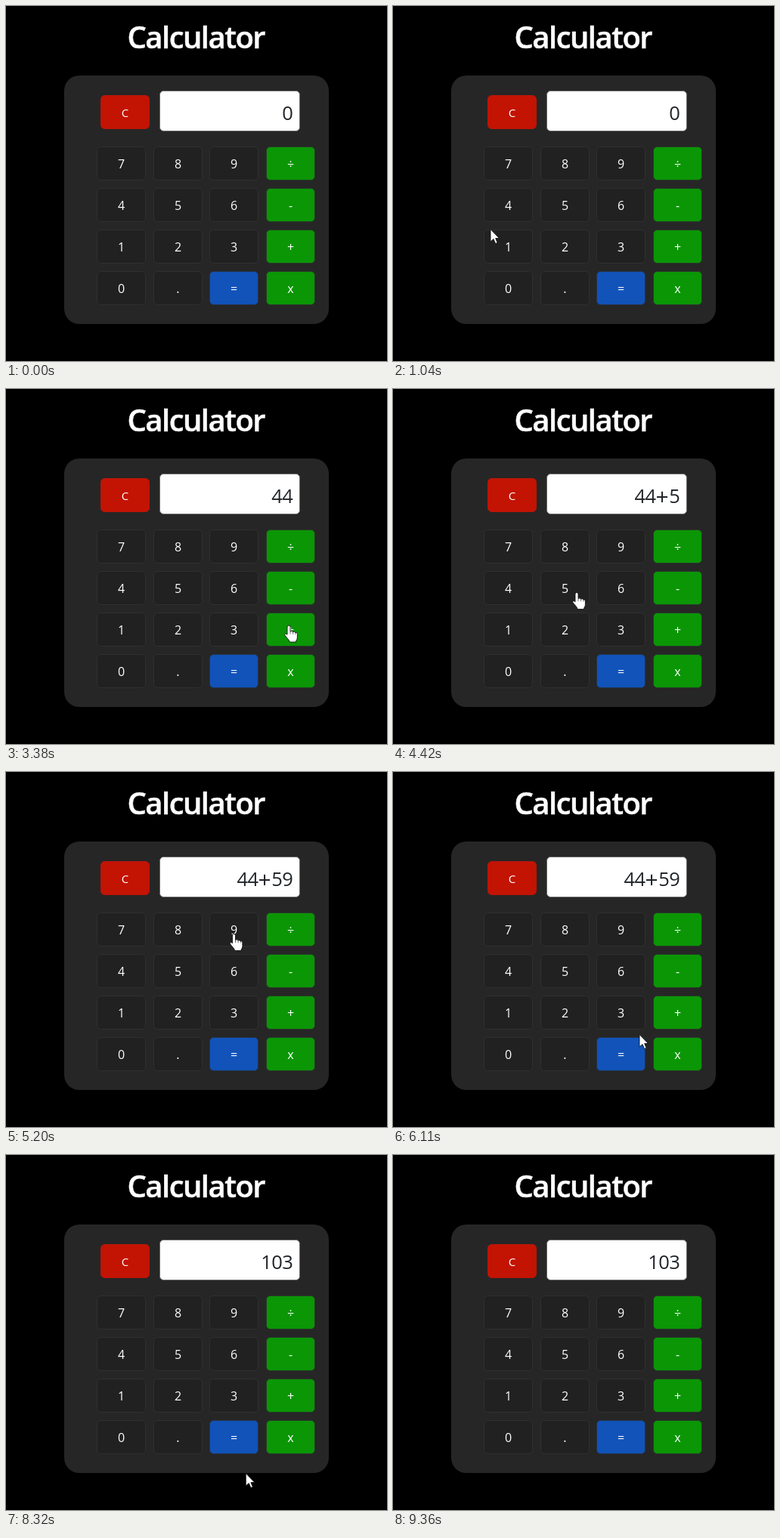
Recreate the animation shown at these times as an HTML page. Size 504x470 px, loop 9.49 s.

```html
<!DOCTYPE html>
<html lang="en">
<head>
<meta charset="utf-8">
<title>Calculator</title>
<style>
  html, body { margin: 0; width: 100%; height: 100%; overflow: hidden; background: #000; }
  svg { display: block; width: 504px; height: 470px; }
  text { font: 16px "Open Sans", "Noto Sans", sans-serif; fill: #fff; text-anchor: middle; }
  #title { font-size: 40px; font-weight: 600; letter-spacing: -1.5px; stroke: #fff; stroke-width: .5; }
  #display { font-size: 25.5px; letter-spacing: -.6px; fill: #212529; text-anchor: end; }
  #display .plus { font-size: 30px; letter-spacing: .6px; }
  .digit { fill: #212121; stroke: #303030; }
  .digit + text { font-weight: 500; }
  .op { fill: #0b9606; stroke: #263a26; }
  .equals { fill: #1153b9; stroke: #25334a; }
  .clear { fill: #c31303; stroke: #b8160a; }
  .clear + text { font-size: 15px; }
  #hand, #arrow { fill: #fff; stroke: #111; stroke-width: .9; stroke-linejoin: round; }
</style>
</head>
<body>
<svg id="stage" viewBox="0 0 504 470">
  <rect width="504" height="470"/>
  <text id="title" x="251.3" y="56">Calculator</text>
  <rect x="77" y="92" width="350" height="329" rx="20" fill="#262626"/>
  <rect x="203.5" y="112.5" width="185" height="53" rx="5" fill="#fff" stroke="#6c6c6c"/>
  <text id="display" x="379.2" y="150.5"></text>
  <g id="keys"></g>
  <g id="cursor">
    <path id="arrow" d="M0 0V16.5L4 13l2.6 6 2.6-1.1L6.7 12H11.6z"/>
    <g id="hand">
      <path d="M-2 12V2a2 2 0 0 1 4 0v6q2-1.6 3.6.6q2-1 3.2.8q2.6-.6 2.6 2v4.6q0 2.5-1.8 4.6V22H1.2q-.3-2-2.4-4.2q-2.6-3-4.2-5.2q.6-2.8 3.4-.4z"/>
      <path d="M2 8v3.5M5.6 8.6v3.2M8.8 9.4v2.6" fill="none" stroke-width=".6"/>
    </g>
  </g>
</svg>
<script>
const LOOP = 9490, STEP = 130;
const KEY_W = 65, KEY_H = 45;
const $ = id => document.getElementById(id);

function add(parent, tag, attrs, text = '') {
  const el = document.createElementNS('http://www.w3.org/2000/svg', tag);
  for (const name in attrs) el.setAttribute(name, attrs[name]);
  el.textContent = text;
  parent.append(el);
}

const keys = {};
function addKey(label, x, y, kind) {
  add($('keys'), 'rect', { x: x + .5, y: y + .5, width: KEY_W - 1, height: KEY_H - 1, rx: 5, class: kind });
  add($('keys'), 'text', { x: x + KEY_W / 2, y: y + 29.3 }, label);
  keys[label] = { x, y };
}

addKey('C', 125, 118, 'clear');
['789÷', '456-', '123+', '0.=x'].forEach((row, r) => [...row].forEach((label, c) => {
  const kind = c === 3 ? 'op' : label === '=' ? 'equals' : 'digit';
  addKey(label, Math.round(120.2 + c * 74.6), 186 + r * 55, kind);
}));

// Pointer stop at a point, from arrival to departure
const at = (x, y, arrive, leave = arrive) => ({ x, y, arrive, leave });

// Pointer stop on a key, off its centre by dx, dy, with the times it is pressed
const on = (label, dx, dy, arrive, leave, ...presses) => ({
  ...at(keys[label].x + KEY_W / 2 + dx, keys[label].y + KEY_H / 2 + dy, arrive, leave), label, presses
});

const stops = [
  at(2, 458, 130, 260),
  on('4', 0, 2, 1300, 1950, 1430, 1950),
  at(473, 300, 2600),
  on('+', -2.5, -5.5, 3250, 3640, 3640),
  on('5', 15.5, 6, 4290, 4420, 4290),
  on('9', 0, 6, 5070, 5590, 5200),
  at(326, 347.5, 6110),
  on('=', 19, -4.5, 6500, 7800, 6890),
  at(314, 474, 8840)
];

function entryAt(t) {
  let entry = '';
  for (const { label, presses = [] } of stops) {
    for (const press of presses) {
      if (press > t) continue;
      entry = label === '=' ? String(entry.split('+').reduce((sum, n) => sum + +n, 0)) : entry + label;
    }
  }
  return entry || '0';
}

const smooth = k => k * k * (3 - 2 * k);

function pointerAt(t) {
  const next = stops.findIndex(s => t < s.arrive);
  if (next < 1) return null;
  const from = stops[next - 1], to = stops[next];
  const k = smooth(Math.max(0, (t - from.leave) / (to.arrive - from.leave)));
  return { x: from.x + (to.x - from.x) * k, y: from.y + (to.y - from.y) * k };
}

let shown = null;
function showEntry(entry) {
  if (entry === shown) return;
  shown = entry;
  $('display').textContent = '';
  const [left, right] = entry.split('+');
  add($('display'), 'tspan', {}, left);
  if (right === undefined) return;
  add($('display'), 'tspan', { class: 'plus', dy: 2.2 }, '+');
  if (right) add($('display'), 'tspan', { dy: -2.2 }, right);
}

const show = (id, visible) => { $(id).style.display = visible ? '' : 'none'; };

function draw(t) {
  showEntry(entryAt(t));
  const tip = pointerAt(t);
  show('cursor', tip);
  if (!tip) return;
  const over = Object.values(keys).some(({ x, y }) =>
    tip.x >= x && tip.x <= x + KEY_W && tip.y >= y && tip.y <= y + KEY_H);
  show('hand', over);
  show('arrow', !over);
  $('cursor').setAttribute('transform', `translate(${tip.x} ${tip.y})`);
}

const start = performance.now();
function tick() {
  const t = (performance.now() - start) % LOOP;
  draw(Math.floor(t / STEP) * STEP);
  requestAnimationFrame(tick);
}
tick();
</script>
</body>
</html>
```
